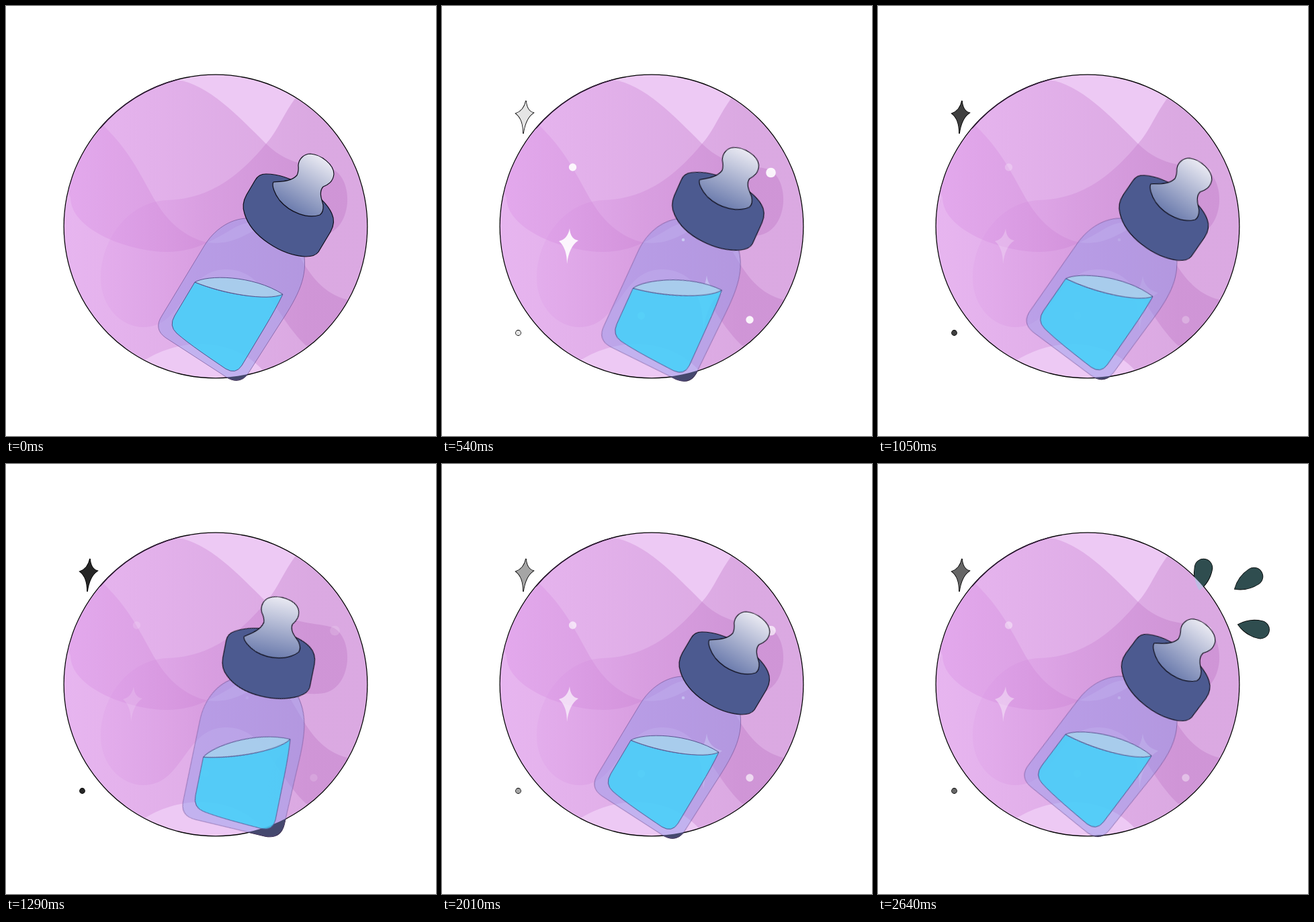
Animation, 640 px wide and 640 px high, one loop 2.67 s. Source, as an HTML page:

```html
<!DOCTYPE html>
<html lang="en">
<head>
<meta charset="utf-8">
<title>Baby bottle</title>
<style>
  html, body { margin: 0; width: 100%; height: 100%; overflow: hidden; background: #fff; }
  svg { display: block; width: 100vw; height: 100vh; }
  .shade { fill: #000; stroke: #000; stroke-width: 1.6; }
</style>
</head>
<body>
<svg viewBox="0 0 640 640">
  <defs>
    <linearGradient id="wash" gradientUnits="userSpaceOnUse" x1="86" y1="0" x2="450" y2="0">
      <stop stop-color="#dd94e8"/><stop offset="1" stop-color="#bd75c4"/>
    </linearGradient>
    <linearGradient id="fadeIn" gradientUnits="userSpaceOnUse" x1="142" y1="0" x2="450" y2="0">
      <stop stop-color="#dd94e8" stop-opacity=".5"/><stop offset=".5" stop-color="#cd85d6"/><stop offset="1" stop-color="#bd75c4"/>
    </linearGradient>
    <linearGradient id="rubber" gradientUnits="userSpaceOnUse" x1="470" y1="226" x2="421" y2="308">
      <stop stop-color="#e9e9f2"/><stop offset="1" stop-color="#6475a9"/>
    </linearGradient>
    <clipPath id="disc"><circle cx="312" cy="328" r="225.2"/></clipPath>
    <path id="body" d="M360 316C333 316 309 334 295 357L232 461Q219 481 238 494L329 553Q349 564 361 546L405 477C432 436 448 408 444 373Z"/>
    <g id="outerSparks">
      <path d="M125 141Q126 156 136 159Q124 167 121 190Q121 168 110 160Q122 156 125 141Z"/>
      <circle cx="113.5" cy="486.5" r="3.6"/>
    </g>
    <path id="drop" d="M0 0C10-9 23-13 34-13A13 13 0 0 1 34 13C23 13 10 9 0 0Z"/>
    <g id="drops">
      <g class="grow" data-place="translate(478 188) rotate(-79)"><use href="#drop"/></g>
      <g class="grow" data-place="translate(531 186) rotate(-33)"><use href="#drop"/></g>
      <g class="grow" data-place="translate(536 239) rotate(13)"><use href="#drop"/></g>
    </g>
  </defs>

  <!-- black backing for translucent parts outside the disc -->
  <g class="shade">
    <use href="#body" class="turn" stroke-width="1"/>
    <use href="#outerSparks" class="visible"/>
    <use href="#drops" class="splash"/>
  </g>

  <circle cx="312" cy="328" r="226.5"/>
  <g clip-path="url(#disc)">
    <rect width="640" height="640" fill="#edc9f4"/>
    <g fill="url(#wash)" fill-opacity=".38">
      <path d="M255 110C300 116 345 163 387 205C426 243 461 234 488 244C520 262 515 342 464 342C415 345 385 305 340 330C306 350 280 366 240 366C185 366 96 334 96 285L60 200L180 80Z"/>
      <path d="M430 138C409 168 403 188 387 205C340 262 296 287 240 289C182 291 141 348 141 405C141 448 172 478 205 478C264 478 266 392 327 392C386 392 396 456 446 505L580 540V100Z" fill="url(#fadeIn)"/>
      <path d="M145 178C211 241 211 301 265 337C313 369 350 345 380 328C430 305 430 418 508 437L560 460V600L385 545C338 491 260 493 205 528L40 600V150Z"/>
    </g>
  </g>
  <path d="M140 182A226 226 0 0 1 255 109.500" fill="none" stroke="#2a1630" stroke-width="1.5"/>

  <g class="spark" fill="#fff">
    <use href="#outerSparks"/>
    <path d="M190 331Q191 347 203 349Q189 358 186 384Q186 360 174 350Q187 347 190 331Z"/>
    <path d="M394 401Q396 421 417 427Q394 440 389 484Q388 442 377 428Q391 425 394 401Z" opacity=".75"/>
    <circle cx="194.500" cy="240" r="5.700"/>
    <circle cx="489.500" cy="248" r="7.300"/>
    <circle cx="458" cy="467" r="5.700"/>
    <circle cx="296.500" cy="461" r="5.700"/>
    <circle cx="359" cy="348" r="2.300"/>
  </g>

  <g class="turn" stroke-width="1" stroke-linejoin="round">
    <use href="#body" fill="#9299ea" fill-opacity=".47" stroke="#6d4f92" stroke-opacity=".65"/>
    <g stroke="#55508c">
      <path d="M281 411L251 461Q242 476 254 487C272 503 305 525 327 540Q342 549 351 535L384 480Q402 450 412 429C378 438 322 428 281 411Z" fill="#44d0f8" fill-opacity=".87"/>
      <path d="M281 411C299 400 367 400 412 429C390 440 322 428 281 411Z" fill="#a6cfec" fill-opacity=".93"/>
    </g>
    <g stroke="#0d0c18" stroke-width="1.200">
      <path d="M387 250Q376 250 371 259L358 281Q350 295 355 309C365 343 410 371 446 373Q460 373 465 366L483 336Q491 322 485 309C474 283 425 250 387 250Z" fill="#4c5a90"/>
      <path d="M435 237C436 227 444 220 453 220C469 221 488 236 488 250C487 262 479 266 472 269C465 277 470 288 472 296Q473 307 467 311C449 317 423 308 407 289C400 280 395 267 398 262C411 261 425 261 433 252Q436 246 435 237Z" fill="url(#rubber)"/>
    </g>
  </g>

  <use href="#drops" class="splash" id="splashColor" fill="#8be0e6"/>
</svg>
<script>
  const LOOP = 2670, BLINK = 600, SPLASH_START = 2100;
  const START_TILT = 8.3;
  // [ms, tilt of the liquid's surface in degrees]
  const tilts = [[0, 8.3], [540, 1.7], [1050, 12.1], [1290, -11.2], [1650, 9.9], [2010, 8.2], [2640, 14.4], [2670, 14.5]];
  const all = selector => document.querySelectorAll(selector);
  const turning = all('.turn'), growing = all('.grow'), splashes = all('.splash');
  const sparks = document.querySelector('.spark');
  const backing = document.querySelector('.visible');
  const splashColor = document.getElementById('splashColor');

  function tiltAt(t) {
    const i = tilts.findIndex(key => key[0] > t);
    const [t0, a] = tilts[i - 1], [t1, b] = tilts[i];
    return a + (b - a) * (1 - Math.cos(Math.PI * (t - t0) / (t1 - t0))) / 2;
  }

  function draw(t) {
    const turn = `rotate(${tiltAt(t) - START_TILT} 361 387)`;
    turning.forEach(part => part.setAttribute('transform', turn));

    const glow = 1 - Math.abs(t % (2 * BLINK) / BLINK - 1);
    sparks.setAttribute('opacity', glow);
    backing.setAttribute('display', glow > 0.01 ? 'inline' : 'none');

    const splash = Math.min(1, Math.max(0, (t - SPLASH_START) / 540));
    growing.forEach(drop => drop.setAttribute('transform', `${drop.dataset.place} scale(${splash})`));
    splashes.forEach(group => group.setAttribute('display', splash ? 'inline' : 'none'));
    splashColor.setAttribute('opacity', 0.34 * splash);
  }

  const start = performance.now();
  function tick(now) {
    draw(Math.max(0, now - start) % LOOP);
    requestAnimationFrame(tick);
  }
  draw(0);
  requestAnimationFrame(tick);
</script>
</body>
</html>
```
